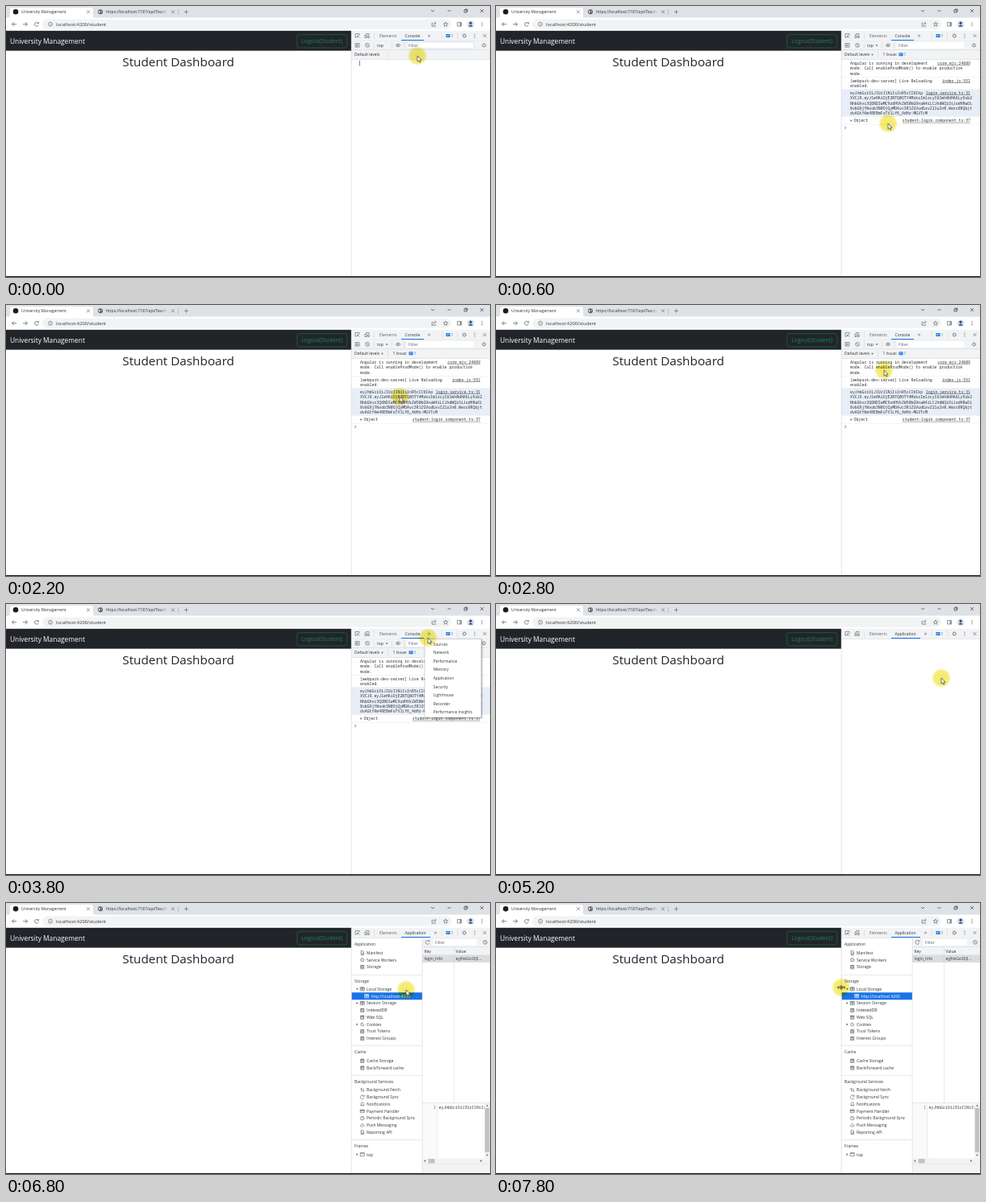
Write an HTML page with a canvas that moves like this. It is 600x337 px and loops after 8000 ms.

```html
<!DOCTYPE html>
<html lang="en">
<head>
<meta charset="utf-8">
<title>Student Dashboard</title>
<style>
html, body { margin: 0; width: 100%; height: 100%; overflow: hidden; background: #fff; }
canvas { display: block; width: 100vw; height: 100vh; }
</style>
</head>
<body>
<canvas id="stage"></canvas>
<script>
const W = 600, H = 337, LOOP = 8000, STEP = 200;
const canvas = document.getElementById('stage');
const ctx = canvas.getContext('2d');

const UI = '"Open Sans", "Noto Sans", sans-serif';
const MONO = '"Noto Sans Mono", "DejaVu Sans Mono", monospace';
const INK = '#303338', GREY = '#5f6368', BAR = '#f1f3f4', LINE = '#cfd2d6', BLUE = '#1a73e8';
const MONO_SIZE = 4.85;

// Icon outlines, centred on 0,0
const ICONS = {
  close: 'M-2-2L2 2M2-2L-2 2',
  plus: 'M-2.5 0H2.5M0-2.5V2.5',
  down: 'M-2-1L0 1L2-1',
  minimise: 'M-2 0H2',
  restore: 'M-2-1H1V2H-2ZM-1-1V-2H2V1H1',
  back: 'M3 0H-2.5M0-2.5L-2.5 0L0 2.5',
  forward: 'M-3 0H2.5M0-2.5L2.5 0L0 2.5',
  reload: 'M2-1.2A2.4 2.4 0 1 0 2.2 1M2.4-2.6V-.9H.7',
  info: 'M2.5 0A2.5 2.5 0 1 1-2.5 0A2.5 2.5 0 1 1 2.5 0M0-.4V1.4M0-1.5V-1.1',
  share: 'M-1-1.5H-2.5V2.5H2V1M-1 1Q-.5-1.5 2.5-1.5M1-3L2.6-1.5L1 0',
  star: 'M0-2.8L.8-.9L2.8-.8L1.2.5L1.8 2.5L0 1.4L-1.8 2.5L-1.2.5L-2.8-.8L-.8-.9Z',
  panel: 'M-2.5-2.3H2.5V2.3H-2.5ZM1-2.3V2.3M1.7-2V2',
  inspect: 'M-.5 2H-2.5V-2.5H2.5V-.5M0 0L2.7 2.7M0 2V0H2',
  device: 'M-1.5-2.5H2.5V-1M-2.5 2.5V-1H-.5V2.5ZM1 0H2.7V2.5H1Z',
  run: 'M-2.5-2.3H2.5V2.3H-2.5ZM-.8-1.2V1.2L1.2 0Z',
  ban: 'M2.4 0A2.4 2.4 0 1 1-2.4 0A2.4 2.4 0 1 1 2.4 0M-1.7-1.7L1.7 1.7',
  eye: 'M-3 0Q0-3.6 3 0Q0 3.6-3 0M.9 0A.9.9 0 1 1-.9 0A.9.9 0 1 1 .9 0',
  gear: 'M1.7 0A1.7 1.7 0 1 1-1.7 0A1.7 1.7 0 1 1 1.7 0M0-2.7V-1.8M0 2.7V1.8M-2.7 0H-1.8M2.7 0H1.8M-1.9-1.9L-1.3-1.3M1.9 1.9L1.3 1.3M1.9-1.9L1.3-1.3M-1.9 1.9L-1.3 1.3',
  db: 'M-2-2H2V2.3H-2ZM-2-.6H2M-2 .9H2M-2-1.6H2',
  grid: 'M-2.5-2H2.5V2H-2.5ZM0-2V2M-2.5 0H2.5M-2.5-1.7H2.5',
  file: 'M-1.6-2.5H.8L1.8-1.4V2.5H-1.6ZM-.8 0H1M-.8 1.2H1',
  cookie: 'M2 0A2 2 0 1 1 0-2L.6-.6L2 0M-.8-.2V.1M.3 1V1.2M-1 1.1V1.2',
  fetch: 'M-1.2 2V-2M-2.5-.8L-1.2-2L0-.8M1.3-2V2M.1.8L1.3 2L2.5.8',
  bell: 'M-2.3 1.5H2.3L1.6.6V-.6Q1.4-2.2 0-2.2Q-1.4-2.2-1.6-.6V.6ZM-.5 2.3H.5',
  card: 'M-2.5-1.8H2.5V1.8H-2.5ZM-2.5-.7H2.5M-2.5-.4H2.5',
  clock: 'M2.3 0A2.3 2.3 0 1 1-2.3 0A2.3 2.3 0 1 1 2.3 0M0-1.4V0L1 .7',
  cloud: 'M-1.5 1.6H1.6Q2.8.8 1.8-.4Q1-2.4-.6-1.6Q-1.4-1.2-1.5-.4Q-3.2.6-1.5 1.6',
  frame: 'M-2.5-2H2.5V2H-2.5ZM-2.5-1.5H2.5',
};

function rect(x, y, w, h, color) {
  ctx.fillStyle = color;
  ctx.fillRect(x, y, w, h);
}
function round(x, y, w, h, r, fill, stroke) {
  ctx.beginPath();
  ctx.roundRect(x, y, w, h, r);
  if (fill) { ctx.fillStyle = fill; ctx.fill(); }
  if (stroke) { ctx.strokeStyle = stroke; ctx.lineWidth = 0.5; ctx.stroke(); }
}
function disc(x, y, r, color) {
  ctx.beginPath();
  ctx.arc(x, y, r, 0, 7);
  ctx.fillStyle = color;
  ctx.fill();
}
function text(s, x, y, { size = 5, color = INK, font = UI, weight = 400, align = 'left' } = {}) {
  ctx.font = `${weight} ${size}px ${font}`;
  ctx.fillStyle = color;
  ctx.textAlign = align;
  ctx.textBaseline = 'alphabetic';
  ctx.fillText(s, x, y + size * 0.36);
}
const mono = (s, x, y, options) => text(s, x, y, { size: MONO_SIZE, font: MONO, ...options });

function shape(path, x, y, { fill, stroke, width = 0.65 } = {}) {
  const p = new Path2D(path);
  ctx.save();
  ctx.translate(x, y);
  if (fill) { ctx.fillStyle = fill; ctx.fill(p); }
  if (stroke) { ctx.strokeStyle = stroke; ctx.lineWidth = width; ctx.stroke(p); }
  ctx.restore();
}
const icon = (name, x, y, color = GREY, width) => shape(ICONS[name], x, y, { stroke: color, width });
const caret = (x, y, open = true) =>
  shape(open ? 'M-1.4-.8H1.4L0 1.2Z' : 'M-.8-1.5V1.5L1.2 0Z', x, y, { fill: GREY });
function dots(x, y) {
  for (const d of [-2, 0, 2]) disc(x, y + d, 0.6, GREY);
}
function badge(x, y) {
  round(x - 2.5, y - 2.2, 5, 4, 0.6, BLUE);
  rect(x - 1.5, y - 1, 3, 0.5, '#fff');
  rect(x - 1.5, y + 0.3, 2, 0.5, '#fff');
  text('1', x + 3.6, y, { color: BLUE });
}

function browser() {
  rect(0, 0, W, 15, '#dee1e6');
  shape('M2 15Q5 15 5 12V5Q5 2 8 2H105Q108 2 108 5V12Q108 15 111 15Z', 0, 0, { fill: '#fff' });
  disc(12, 7.3, 3.3, '#1c1c1c');
  text('University Management', 19, 7.3);
  icon('close', 102, 7.3);
  disc(117, 7.3, 3, GREY);
  shape('M-2-1Q0-2 0 0Q-1 2-2 1ZM1-1.8L2-.6L1 .8Z', 117, 7.3, { fill: '#dee1e6' });
  text('https://localhost:7187/api/Teach', 124, 7.3);
  const fade = ctx.createLinearGradient(190, 0, 203, 0);
  fade.addColorStop(0, '#dee1e600');
  fade.addColorStop(1, '#dee1e6');
  rect(190, 3, 16, 10, fade);
  icon('close', 207, 7.3);
  rect(213.5, 4, 0.5, 7, '#9a9da2');
  icon('plus', 223.5, 7.3);
  icon('down', 529, 6, INK);
  icon('minimise', 549.5, 6, INK);
  icon('restore', 570, 6, INK);
  icon('close', 590, 6, INK);

  rect(0, 14.5, W, 16.3, '#fff');
  round(45, 16.6, 507, 12.2, 6.1, BAR);
  icon('back', 10, 22.7, GREY, 0.8);
  icon('forward', 24, 22.7, GREY, 0.8);
  icon('reload', 38, 22.7, GREY, 0.8);
  icon('info', 55, 22.7);
  text('localhost:4200/student', 62, 22.6, { size: 5.8 });
  icon('share', 530.5, 22.7);
  icon('star', 545, 22.7);
  icon('panel', 562, 22.7);
  disc(576, 22.7, 4.4, '#d3e0f5');
  disc(576, 21.2, 1.6, '#35465f');
  shape('M-2.8 2.5Q0-1.5 2.8 2.5Z', 576, 23, { fill: '#35465f' });
  dots(590, 22.7);
}

function page() {
  rect(0, 30.8, 428, 24.8, '#212529');
  text('University Management', 5, 43.6, { size: 8.37, color: '#fff' });
  round(360.8, 35.6, 62, 16.4, 2.6, null, '#198754');
  text('Logout(Student)', 391.7, 43.6, { size: 6.8, color: '#198754', align: 'center' });
  text('Student Dashboard', 213.6, 69.6, { size: 15.3, color: '#212529', weight: 500, align: 'center' });
}

function devtoolsTabs(app) {
  rect(428, 30.8, 172, 12.4, BAR);
  rect(428, 43, 172, 0.5, LINE);
  icon('inspect', 435.5, 37);
  icon('device', 447.5, 37);
  rect(456, 33, 0.5, 8, LINE);
  text('Elements', 463, 37.2, { color: GREY });
  text(app ? 'Application' : 'Console', 494.5, 37.2);
  rect(490, 42, app ? 36 : 28, 1, BLUE);
  text('»', app ? 532.5 : 524.5, 36.7, { size: 7, color: GREY, align: 'center' });
  rect(540, 33, 0.5, 8, LINE);
  badge(548, 37.2);
  rect(559.5, 33, 0.5, 8, LINE);
  icon('gear', 568.3, 37);
  dots(581, 37);
  icon('close', 593.5, 37);
}

const TOKEN = [
  'eyJhbGciOiJIUzI1NiIsInR5cCI6Ikp',
  'XVCJ9.eyJleHAiOjE2NTQ0OTY4MzksImlzcyI6Imh0dHA6Ly9sb2',
  'NhbGhvc3Q6NDIwMC9zdHVkZW50bG9naW4iLCJhdWQiOiJodHRwOi',
  '8vbG9jYWxob3N0OjQyMDAvc3R1ZGVudGxvZ2luIn0.Wers8RQbjt',
  'dvAGtYKm4REBmFoTV1Lf6_4dHr-MGVTcM',
];
const lines = (rows, y) => rows.forEach((row, i) => mono(row, 439, y + i * 6.4));
function link(s, y) {
  mono(s, 588, y, { align: 'right' });
  const w = ctx.measureText(s).width;
  rect(588 - w, y + 2.5, w, 0.4, INK);
}

function consolePanel(loaded, selecting) {
  rect(428, 43.5, 172, 23, BAR);
  rect(428, 54.3, 172, 0.5, LINE);
  rect(428, 66.2, 172, 0.5, LINE);
  icon('run', 435.5, 48.8);
  icon('ban', 448, 48.8);
  rect(456, 45, 0.5, 8, LINE);
  text('top', 460, 48.8);
  rect(478.5, 45, 0.5, 8, LINE);
  icon('eye', 486, 48.8);
  rect(493, 45, 0.5, 8, LINE);
  round(497, 44.7, 83, 8.2, 0.5, '#fff', loaded ? null : '#b9cdf0');
  text('Filter', 499, 48.8, { color: GREY });
  icon('gear', 592.5, 48.8);
  text('Default levels', 432, 60.4);
  rect(472.8, 56.5, 0.5, 8, LINE);
  if (!loaded) {
    rect(438.2, 68, 0.6, 6.5, INK);
    return;
  }
  caret(472, 49);
  rect(468.5, 57.5, 6, 6, BAR);
  caret(466.5, 60.6);
  rect(473.2, 56.5, 0.5, 8, LINE);
  text('1 Issue:', 479.5, 60.4);
  badge(502, 60.4);

  lines(['Angular is running in development', 'mode. Call enableProdMode() to enable production', 'mode.'], 71.2);
  link('core.mjs:24889', 71.2);
  rect(428, 88, 172, 0.4, '#e4e6e9');
  lines(['[webpack-dev-server] Live Reloading', 'enabled.'], 92.9);
  link('index.js:551', 92.9);
  rect(428, 103.3, 172, 34.4, '#e8eef8');
  if (selecting) {
    rect(474.5, 117.8, 115, 6.4, '#a9cbf5');
    rect(439, 124.2, 58, 6.4, '#a9cbf5');
  }
  lines(TOKEN, 108);
  link('login.service.ts:31', 108);
  caret(440.3, 142.4, false);
  mono('Object', 443.5, 142.4);
  link('student-login.component.ts:37', 142.4);
  rect(428, 147.3, 172, 0.4, '#e4e6e9');
  shape('M-1-1.5L.8 0L-1 1.5', 433.3, 151.5, { stroke: BLUE, width: 0.8 });
}

const MENU = ['Sources', 'Network', 'Performance', 'Memory', 'Application', 'Security',
  'Lighthouse', 'Recorder', 'Performance insights'];
function menu(pointerY) {
  ctx.save();
  ctx.shadowColor = '#0006';
  ctx.shadowBlur = 2;
  ctx.shadowOffsetX = ctx.shadowOffsetY = 1;
  rect(519, 43.3, 70, 97.7, '#fff');
  ctx.restore();
  ctx.strokeStyle = '#b5b8bc';
  ctx.lineWidth = 0.5;
  ctx.strokeRect(519, 43.3, 70, 97.7);
  MENU.forEach((name, i) => {
    const y = 50 + i * 10.55;
    if (Math.abs(pointerY - y) < 5.2) rect(520, y - 5.2, 68.5, 10.4, '#ececee');
    text(name, 529.7, y, { size: 4.9 });
  });
}

const SECTIONS = [
  ['Application', 51, 62, [['file', 'Manifest'], ['gear', 'Service Workers'], ['db', 'Storage']]],
  ['Storage', 97, 107, [['grid', 'Local Storage', 'open'], ['grid', 'http://localhost:4200', 'selected'],
    ['grid', 'Session Storage', 'shut'], ['db', 'IndexedDB'], ['db', 'Web SQL'], ['cookie', 'Cookies', 'shut'],
    ['db', 'Trust Tokens'], ['db', 'Interest Groups']]],
  ['Cache', 185.5, 196.2, [['db', 'Cache Storage'], ['db', 'Back/forward cache']]],
  ['Background Services', 222.2, 232.5, [['fetch', 'Background Fetch'], ['reload', 'Background Sync'],
    ['bell', 'Notifications'], ['card', 'Payment Handler'], ['clock', 'Periodic Background Sync'],
    ['cloud', 'Push Messaging'], ['file', 'Reporting API']]],
  ['Frames', 302.2, 312.7, [['frame', 'top', 'shut']]],
];

function applicationPanel() {
  SECTIONS.forEach(([title, titleY, top, items], n) => {
    if (n) rect(428, titleY - 8, 88, 0.5, LINE);
    text(title, 432, titleY);
    items.forEach(([glyph, label, state], i) => {
      const y = top + i * 8.78, selected = state === 'selected', indent = selected ? 5.5 : 0;
      if (selected) rect(428.5, y - 4.5, 87.5, 9, BLUE);
      if (state === 'open' || state === 'shut') caret(435.3, y, state === 'open');
      icon(glyph, 441.7 + indent, y, selected ? '#fff' : GREY);
      text(label, 447 + indent, y, { color: selected ? '#fff' : INK });
    });
  });

  rect(516, 43.5, 84, 11, BAR);
  icon('reload', 522.5, 48.8);
  round(529.5, 44.7, 54, 8.2, 0.5, '#fff');
  text('Filter', 532, 48.8, { color: GREY });
  icon('ban', 594, 48.8);
  rect(516, 54.5, 84, 10.3, BAR);
  rect(516, 54.3, 84, 0.5, LINE);
  rect(516, 64.6, 84, 0.5, LINE);
  rect(516, 65, 84, 9, '#dadce0');
  text('Key', 518.5, 60);
  text('Value', 557.5, 60);
  text('login_Info', 518.5, 69.4);
  text('eyJhbGciOiJI...', 557.5, 69.4);
  rect(555.3, 54.5, 0.5, 194, LINE);
  rect(516, 248.5, 84, 0.6, LINE);

  rect(516, 249, 18.5, 68, '#fafafa');
  rect(534.5, 249, 0.4, 68, LINE);
  mono('1', 530, 253.8, { color: GREY });
  ctx.save();
  ctx.beginPath();
  ctx.rect(535, 249, 58, 68);
  ctx.clip();
  mono('eyJhbGciOiJIUzI1NiIsInR5', 536.5, 253.8);
  ctx.restore();
  rect(593, 249, 7, 68.5, BAR);
  rect(593.8, 255, 5.4, 55, '#c1c1c1');
  caret(596.5, 313.5);
  shape('M-1.4.8H1.4L0-1.2Z', 596.5, 252, { fill: GREY });
  rect(516, 317.5, 84, 6.7, BAR);
  rect(523.5, 318.2, 8, 5.3, '#c1c1c1');
  shape('M.8-1.5V1.5L-1.2 0Z', 519.3, 320.8, { fill: GREY });
  caret(589, 320.8, false);
  rect(516, 324.3, 84, 0.5, LINE);
  rect(516, 324.8, 84, 11, BAR);
  rect(515.8, 43.3, 0.5, 293, LINE);
}

// Pointer path: time, x, y
const PATH = [
  [0, 510, 62], [600, 486, 146], [1000, 478, 122], [1400, 483, 120], [1800, 494, 142],
  [2400, 486, 104], [2800, 481, 81], [3000, 481, 81], [3600, 522, 42], [3800, 523, 42],
  [4600, 542, 92], [5000, 545, 92], [5200, 552, 92], [6000, 542, 71], [6400, 492, 109],
  [6800, 496, 108], [7200, 540, 72], [7800, 428, 105],
];
function pointerAt(t) {
  const next = PATH.findIndex(p => p[0] > t);
  if (next < 0) return PATH.at(-1).slice(1);
  const [t0, x0, y0] = PATH[next - 1], [t1, x1, y1] = PATH[next];
  const u = (t - t0) / (t1 - t0), k = u * u * (3 - 2 * u);
  return [x0 + (x1 - x0) * k, y0 + (y1 - y0) * k];
}

function pointer(x, y) {
  const halo = ctx.createRadialGradient(x, y, 0, x, y, 12.3);
  halo.addColorStop(0, '#f0e23ccc');
  halo.addColorStop(0.75, '#f3e64fbb');
  halo.addColorStop(1, '#f6ec7000');
  ctx.save();
  ctx.globalCompositeOperation = 'multiply';
  disc(x, y, 12.3, halo);
  ctx.restore();
  if (Math.abs(x - 428) < 2) {
    shape('M-.8-2.5V2.5M.8-2.5V2.5M-1 0H-4.5M-3-1.6L-4.6 0L-3 1.6M1 0H4.5M3-1.6L4.6 0L3 1.6', x, y,
      { stroke: '#222', width: 0.8 });
  } else {
    shape('M0 0V7.2L1.7 5.7L2.8 8.2L4 7.7L2.9 5.2H5.2Z', x, y, { fill: '#fff', stroke: '#222', width: 0.6 });
  }
}

function draw(t) {
  const [x, y] = pointerAt(t), app = t >= 5000;
  rect(0, 0, W, H, '#fff');
  browser();
  page();
  devtoolsTabs(app);
  if (!app) consolePanel(t >= 200, t >= 1000 && t < 2200);
  else if (t >= 5400) applicationPanel();
  rect(427.8, 30.8, 0.6, 306, LINE);
  if (t >= 3800 && !app) menu(t > 3800 ? y : 0);
  rect(0, 336, W, 1, '#111');
  pointer(x, y);
}

function tick() {
  const ratio = window.devicePixelRatio || 1;
  const w = Math.round(innerWidth * ratio), h = Math.round(innerHeight * ratio);
  if (canvas.width !== w || canvas.height !== h) {
    canvas.width = w;
    canvas.height = h;
  }
  ctx.setTransform(w / W, 0, 0, h / H, 0, 0);
  draw(Math.floor((performance.now() % LOOP) / STEP) * STEP);
  requestAnimationFrame(tick);
}
tick();
</script>
</body>
</html>
```
